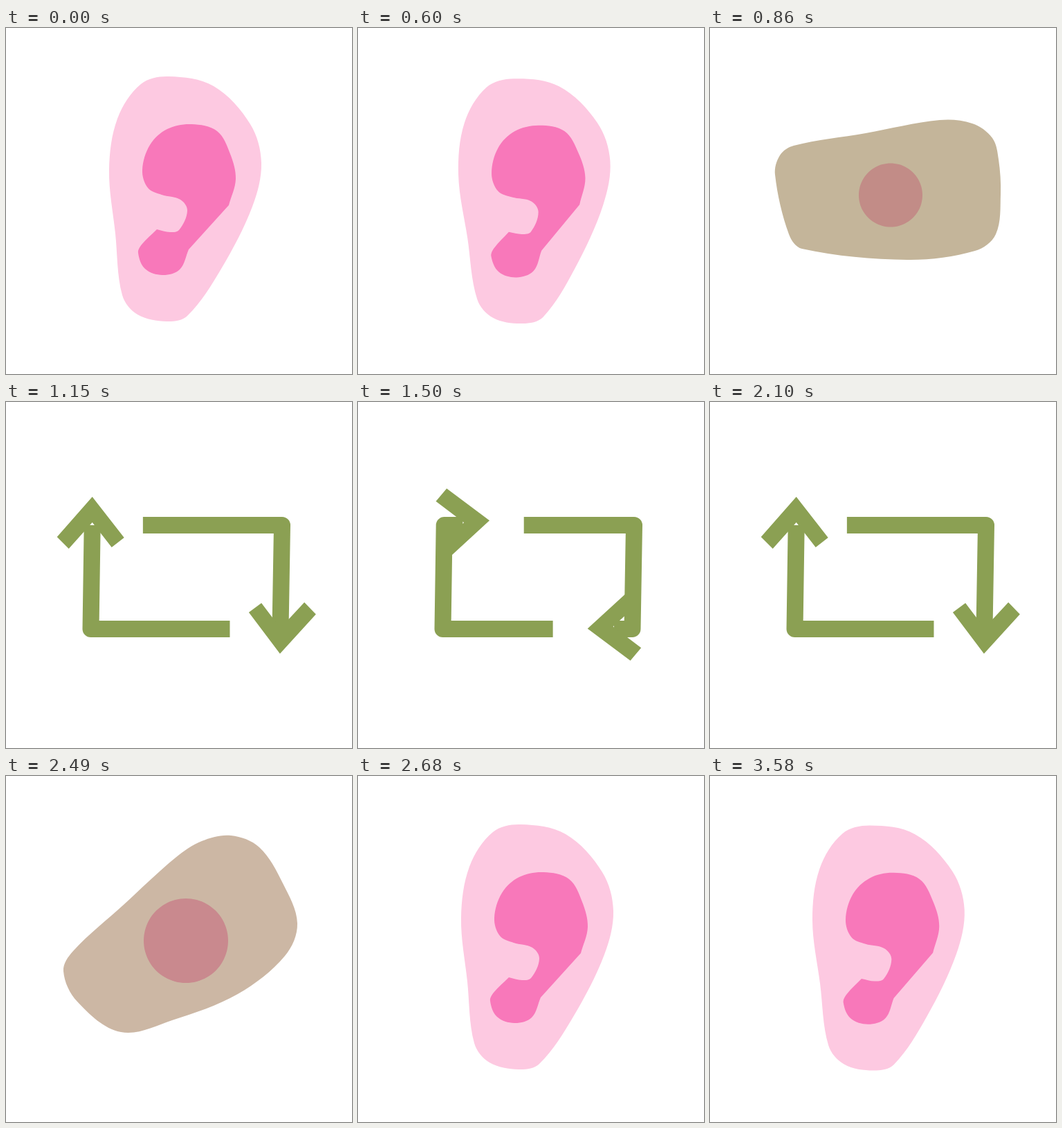
An HTML page with a canvas that plays this animation: 500 by 500 pixels, repeating every 3680 ms.

```html
<!DOCTYPE html>
<html lang="en">
<head>
<meta charset="utf-8">
<title>Listen and repeat</title>
<style>
  html, body { margin: 0; width: 100%; height: 100%; overflow: hidden; background: #fff; }
  canvas { display: block; width: 500px; height: 500px; }
</style>
</head>
<body>
<canvas id="stage" width="500" height="500"></canvas>
<script>
const ctx = document.getElementById('stage').getContext('2d');
const LOOP = 3680;
const SKIN = [253, 201, 225], INNER = [248, 120, 186], GREEN = [139, 160, 83];

const mix = (a, b, k) => a + (b - a) * k;
const mixAll = (a, b, k) => a.map((v, i) => mix(v, b[i], k));
const rgb = c => `rgb(${c.map(Math.round).join()})`;

// ---------- ear to rectangle ----------

const bodies = [
  // upright ear
  [232,424, 190,414, 168,386, 158,297, 149,205, 161,131, 195,81,
   235,70, 300,84, 353,139, 369,195, 356,258, 311,348, 262,416],
  // tilted
  [103,326, 83,282, 97,253, 170,186, 245,118, 283,94, 325,86,
   366,103, 400,155, 421,213, 403,260, 335,315, 240,353, 166,370],
  // lying
  [94,212, 101,184, 121,170, 225,152, 332,133, 379,138, 408,159,
   417,190, 420,240, 413,298, 383,322, 285,335, 133,319, 114,298],
  // rectangle
  [111,260, 113,180, 125,166, 225,166, 330,166, 399,166, 408,170,
   411,178, 410,240, 408,328, 396,340, 285,340, 123,340, 111,328]
];

// Doubled points make sharp corners.
const earInner = [
  197,205, 208,169, 233,146, 268,139, 305,149, 324,182, 332,218, 322,256,
  322,256, 264,320, 264,320, 251,349, 226,357, 201,348, 191,325, 196,313,
  218,291, 218,291, 237,295, 250,292, 262,264, 252,248, 225,241, 205,231
];

function disc(x, y, r) {
  const n = earInner.length / 2, out = [];
  for (let i = 0; i < n; i++) {
    const a = Math.PI + i / n * Math.PI * 2;
    out.push(x + r * Math.cos(a), y + r * Math.sin(a));
  }
  return out;
}

const inners = [earInner, disc(260, 238, 61), disc(261, 241.5, 46), disc(261, 253, 20)];

function blend(poses, q) {
  const i = Math.min(Math.floor(q), poses.length - 2);
  return mixAll(poses[i], poses[i + 1], q - i);
}

function fillSmooth(flat, color) {
  const n = flat.length / 2;
  const at = i => { const j = (i + n) % n * 2; return [flat[j], flat[j + 1]]; };
  const tangent = i => {
    const [ax, ay] = at(i - 1), [bx, by] = at(i + 1);
    const d = Math.hypot(bx - ax, by - ay) || 1;
    return [(bx - ax) / d, (by - ay) / d];
  };
  ctx.beginPath();
  ctx.moveTo(...at(0));
  for (let i = 0; i < n; i++) {
    const [ax, ay] = at(i), [bx, by] = at(i + 1);
    const [ux, uy] = tangent(i), [vx, vy] = tangent(i + 1);
    const h = Math.hypot(bx - ax, by - ay) / 3;
    ctx.bezierCurveTo(ax + ux * h, ay + uy * h, bx - vx * h, by - vy * h, bx, by);
  }
  ctx.fillStyle = rgb(color);
  ctx.fill();
}

const sways = [[0, 0, 0], [-1.3, 0, 1], [-2.6, -2, 2]];

function drawEar({ q = 0, green = 0, sway = 0 }) {
  const [deg, dx, dy] = sways[sway];
  ctx.save();
  ctx.translate(260 + dx, 250 + dy);
  ctx.rotate(deg * Math.PI / 180);
  ctx.translate(-260, -250);
  fillSmooth(blend(bodies, q), mixAll(SKIN, GREEN, green));
  fillSmooth(blend(inners, q), mixAll(INNER, GREEN, green));
  ctx.restore();
}

// ---------- circling arrows ----------

const corners = [[124.7, 178], [399, 178], [396.5, 328], [122.5, 328]];
const sides = corners.map(([x, y], i) => {
  const [nx, ny] = corners[(i + 1) % 4];
  return { x, y, len: Math.hypot(nx - x, ny - y), angle: Math.atan2(ny - y, nx - x) };
});
const perimeter = sides.reduce((sum, s) => sum + s.len, 0);
const half = perimeter / 2;
const TRAIL = 351;

function locate(s) {
  let u = (s % perimeter + perimeter) % perimeter, i = 0;
  while (i < 3 && u >= sides[i].len) u -= sides[i++].len;
  const { x, y, angle } = sides[i];
  return { i, u, angle, x: x + u * Math.cos(angle), y: y + u * Math.sin(angle) };
}

function drawTrail(from, to) {
  const start = locate(from);
  let i = start.i, s = from + sides[i].len - start.u;
  ctx.beginPath();
  ctx.moveTo(start.x, start.y);
  while (s < to) {
    i = (i + 1) % 4;
    ctx.lineTo(...corners[i]);
    s += sides[i].len;
  }
  const end = locate(to);
  ctx.lineTo(end.x, end.y);
  ctx.stroke();
}

function drawArrow(s, size) {
  const { u, angle } = locate(s);
  // The head swings round each corner and briefly lags behind.
  const swing = Math.exp(-u / 14);
  const lag = u < 120 ? 17 * Math.sin(Math.PI * u / 120) : 0;
  const turn = angle - Math.PI / 2 * swing;
  const hub = locate(s - lag);
  drawTrail(s - (size < 1 ? half : TRAIL), s - lag);

  ctx.save();
  ctx.translate(hub.x, hub.y - 1.7 * u * swing);
  ctx.rotate(turn + Math.PI / 2);
  ctx.scale(size, size);
  ctx.translate(0, -38.5 + 2.5 * Math.sin(turn));
  ctx.beginPath();
  for (const p of [[0, 0], [46, 59], [28, 73], [0, 37], [-34, 75], [-51, 58]]) ctx.lineTo(...p);
  ctx.fill();
  ctx.restore();
}

function drawArrows({ spin = 0, open = 1 }) {
  ctx.fillStyle = ctx.strokeStyle = rgb(GREEN);
  ctx.lineWidth = 24;
  ctx.lineJoin = 'round';
  if (open < 1) {
    ctx.beginPath();
    corners.forEach(c => ctx.lineTo(...c));
    ctx.closePath();
    ctx.fill();
    ctx.stroke();
    ctx.clearRect(260.5 - 124.5 * open, 253 - 63 * open, 249 * open, 126 * open);
  }
  drawArrow(spin * half, open);
  drawArrow((spin + 1) * half, open);
}

// ---------- timeline ----------

const timeline = [];
const add = (at, draw, state) => timeline.push({ at, draw, state });

add(0, drawEar, {});
[1, 2, 1].forEach((sway, i) => add(500 + i * 100, drawEar, { sway }));
[0.5, 1, 2, 2.4, 2.7, 3].forEach((q, i) =>
  add(800 + i * 30, drawEar, { q, green: (i + 1) / 6 }));
add(1050, drawArrows, { open: 1 / 3 });
add(1100, drawArrows, { open: 2 / 3 });
for (let i = 0; i <= 19; i++)
  add(1150 + i * 50, drawArrows, { spin: 3 * (i / 19) ** 1.006 });
[0.75, 0.5, 0.25].forEach((open, i) => add(2150 + i * 50, drawArrows, { open }));
add(2300, drawEar, { q: 3, green: 1 });
[2.7, 2.35, 1.7, 1, 0.6, 0.25].forEach((q, i) =>
  add(2400 + i * 30, drawEar, { q, green: 1 - (i + 1) / 7 }));
add(2580, drawEar, { sway: 2 });
add(2680, drawEar, {});
add(3180, drawEar, { sway: 2 });
[1, 2, 1].forEach((sway, i) => add(3380 + i * 100, drawEar, { sway }));

const began = performance.now();

function render() {
  const t = (performance.now() - began) % LOOP;
  let step = timeline[0];
  for (const next of timeline) if (next.at <= t) step = next;
  ctx.clearRect(0, 0, 500, 500);
  step.draw(step.state);
  requestAnimationFrame(render);
}
render();
</script>
</body>
</html>
```
